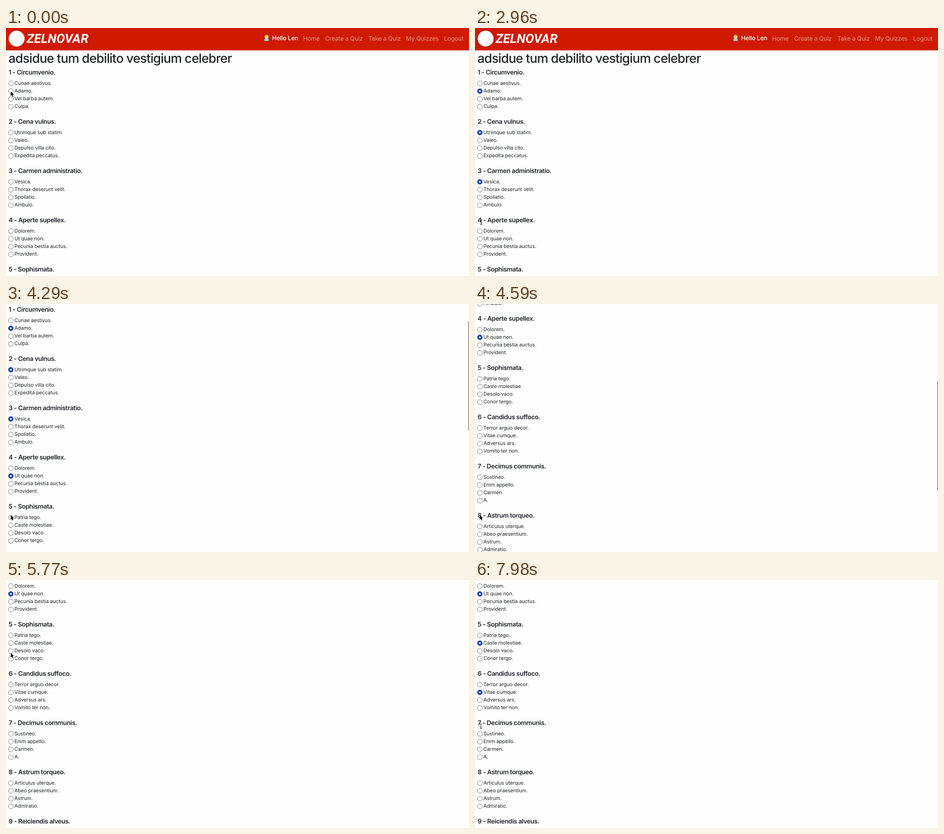
Recreate the animation shown at these times as an HTML page. Size 1021 by 549 pixels, loop 8 s.

```html
<!DOCTYPE html>
<html lang="en">
<head>
<meta charset="utf-8">
<title>Quiz</title>
<style>
html, body { margin: 0; width: 100%; height: 100%; overflow: hidden; background: #fefefe; }
svg { display: block; width: 1021px; height: 549px; }
text { font-family: Inter, "Open Sans", sans-serif; font-optical-sizing: none; fill: #212529; white-space: pre; text-rendering: geometricPrecision; }
.title { font-size: 28px; font-weight: 500; letter-spacing: -.87px; }
.head { font-size: 14px; font-weight: 600; letter-spacing: -.38px; }
.option { font-size: 11.2px; letter-spacing: -.12px; }
.nav { font-size: 13.4px; letter-spacing: -.22px; fill: #fff; fill-opacity: .55; }
.hello { font-weight: 500; fill-opacity: 1; }
.brand { font: italic 700 28px Roboto, sans-serif; fill: #fff; }
</style>
</head>
<body>
<svg viewBox="0 0 1021 549">
  <rect width="1021" height="549" fill="#fefefe"/>
  <g id="page">
    <rect width="1021" height="49.5" fill="#cf1a00"/>
    <circle cx="23.5" cy="23.5" r="17.5" fill="#fff"/>
    <text class="brand" x="45.5" y="33">ZELNOVAR</text>
    <g>
      <path d="M568.8 28.5v-2.5q0-3 3-3h5.6q3 0 3 3v2.5z" fill="#5b7f95"/>
      <circle cx="574.6" cy="19.4" r="4.6" fill="#e5b532"/>
      <ellipse cx="574.6" cy="20.7" rx="3.2" ry="3.5" fill="#f6d3a4"/>
      <rect x="570.3" y="24.2" width="8.6" height="4.6" rx=".8" fill="#c3c8c9"/>
    </g>
    <text class="title" x="5.6" y="77.3">adsidue tum debilito vestigium celebrer</text>
  </g>
  <rect id="thumb" x="1019.6" width="1.4" height="242" fill="#777"/>
  <path id="arrow" d="M0 0V10L2.3 7.9L4 11.7L5.8 10.9L4.2 7.3H7.2Z" fill="#000" stroke="#fff" stroke-width=".8" stroke-linejoin="round" paint-order="stroke"/>
  <path id="beam" d="M-2.5-5.5Q0-5.5 0-4Q0-5.5 2.5-5.5M0-4V4M-2.5 5.5Q0 5.5 0 4Q0 5.5 2.5 5.5M-1.2 2H1.2" fill="none" stroke="#111"/>
</svg>
<script>
const LOOP = 8000, TICK = 147.7;      // the picture is refreshed once per tick
const BLOCK = 109, ROW = 17.25, END = 4 * BLOCK;
const $ = id => document.getElementById(id);
const page = $("page");

const nav = [[655, "Home"], [703.7, "Create a Quiz"], [799, "Take a Quiz"], [882, "My Quizzes"], [966, "Logout"]];

// heading, then its four answers
const quiz = [
  "Circumvenio|Cunae aestivus|Adamo|Vel barba autem|Culpa",
  "Cena vulnus|Utrimque sub statim|Valeo|Depulso villa cito|Expedita peccatus",
  "Carmen administratio|Vesica|Thorax deserunt velit|Spoliatio|Ambulo",
  "Aperte supellex|Dolorem|Ut quae non|Pecunia bestia auctus|Provident",
  "Sophismata|Patria tego|Caste molestiae|Desolo vaco|Conor tergo",
  "Candidus suffoco|Terror arguo decor|Vitae cumque|Adversus ars|Vomito ter non",
  "Decimus communis|Sustineo|Enim appello|Carmen|A",
  "Astrum torqueo|Articulus uterque|Abeo praesentium|Astrum|Admiratio",
  "Reiciendis alveus"
].map(q => q.split("|"));

// answer picked for each question, the tick of the press, the tick the pointer leaves
const clicks = [[1, 1], [0, 10], [0, 18], [1, 26, 36], [1, 43], [1, 51], [0, 60]]
  .map(([answer, press, leave = press], q) => ({ q, answer, press, leave }));

const clamp = p => Math.min(1, Math.max(0, p));
const easeOut = p => 1 - (1 - p) ** 3;
const radioY = (q, i) => q * BLOCK + i * ROW + 122.5;
const scrollAt = tick => Math.round(END * Math.sin(clamp((tick - 27.837) / 3.97) * Math.PI / 2) ** 2);

function add(tag, attrs, text = "") {
  const el = document.createElementNS("http://www.w3.org/2000/svg", tag);
  for (const k in attrs) el.setAttribute(k, attrs[k]);
  el.textContent = text;
  page.append(el);
  return el;
}

function label(cls, x, y, text) {
  add("text", { class: cls, x, y }, text);
}

label("nav hello", 586.7, 27.4, "Hello Len");
nav.forEach(([x, text]) => label("nav", x, 27.9, text));

const radios = quiz.map(([head, ...answers], q) => {
  label("head", 5.7, q * BLOCK + 103.3, `${q + 1} - ${head}.`);
  return answers.map((answer, i) => {
    const cy = radioY(q, i);
    label("option", 18.5, cy + 3.1, answer + ".");
    return {
      ring: add("circle", { cx: 10.7, cy, r: 5.4 }),
      dot: add("circle", { cx: 10.7, cy, r: 2.1, fill: "#fff" })
    };
  });
});

const show = (el, on) => el.setAttribute("visibility", on ? "visible" : "hidden");
const place = (el, x, y) => el.setAttribute("transform", `translate(${x} ${y})`);

function paint({ ring, dot }, on, pressed) {
  ring.setAttribute("fill", on ? "#1d41ad" : "#fff");
  ring.setAttribute("stroke", on ? "#1d41ad" : pressed ? "#8d8d8d" : "#707070");
  show(dot, on);
}
radios.flat().forEach(r => paint(r));

// the pointer glides from each picked answer to the next, bowing right on the way down
function pointer(tick) {
  const from = clicks.findLast(c => c.press <= tick) || clicks[0];
  const to = clicks[from.q + 1];
  const [y0, y1] = [from, to].map(c => radioY(c.q, c.answer) - scrollAt(c.press));
  const p = clamp((tick - from.leave) / (to.press - 2 - from.leave));
  const bow = 0.03 * Math.max(0, y1 - y0);
  return [10.5 + bow * Math.sin(Math.PI * p), y0 + 0.5 + (y1 - y0) * easeOut(p)];
}

function draw(t) {
  const tick = Math.floor(t / TICK), scroll = scrollAt(tick);
  place(page, 0, -scroll);
  $("thumb").setAttribute("y", 1 + 0.43 * scroll);
  show($("thumb"), scroll > 0 && tick < 36);

  for (const { q, answer, press } of clicks)
    paint(radios[q][answer], tick > press, tick === press);

  const [x, y] = pointer(tick);
  const overHead = (y + scroll) % BLOCK > 98;
  show($("arrow"), !overHead);
  show($("beam"), overHead);
  place($(overHead ? "beam" : "arrow"), x, y);
}

const start = performance.now();
function frame() {
  draw((performance.now() - start) % LOOP);
  requestAnimationFrame(frame);
}
frame();
</script>
</body>
</html>
```
